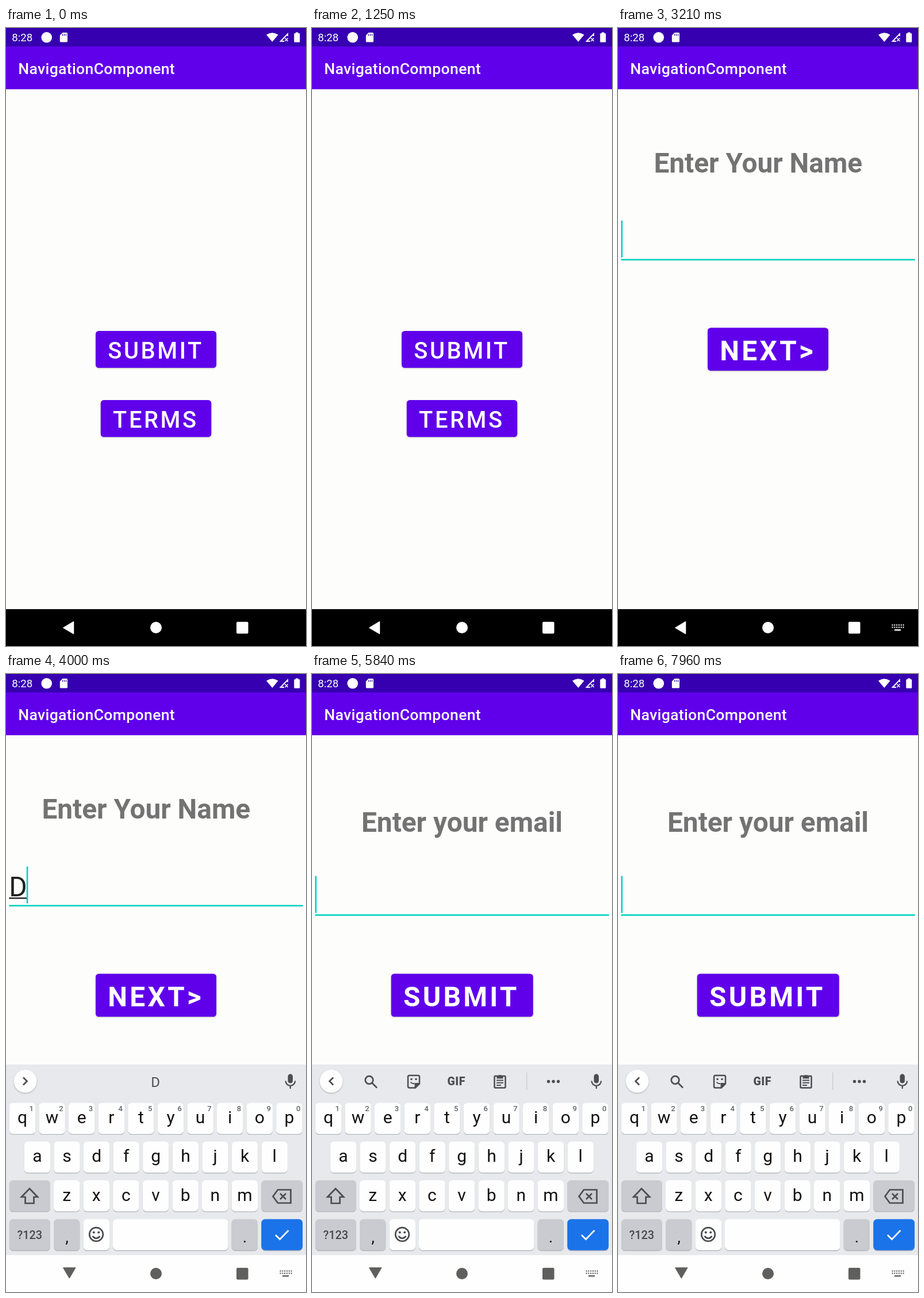
Write an HTML page that moves like this. It is 522x1073 px and loops after 8 s.

```html
<!DOCTYPE html>
<html lang="en">
<head>
<meta charset="utf-8">
<title>NavigationComponent</title>
<style>
  html, body { margin: 0; width: 100%; height: 100%; overflow: hidden; background: #fdfdfc; }
  svg { display: block; width: 522px; height: 1073px; font-family: Roboto, "Noto Sans", sans-serif; }
  text { white-space: pre; }
  .mid { text-anchor: middle; }
  .heading { font-size: 47.8px; font-weight: 700; fill: #737373; }
  .raised { filter: drop-shadow(0 1.4px 1.3px rgba(0, 0, 0, .28)); }
  .line { fill: none; stroke: #4a4d51; stroke-width: 2.7; }
  .icon { fill: #4a4d51; }
  .letter { font-size: 30px; fill: #111; text-anchor: middle; }
  .hint { font-size: 13px; font-weight: 500; fill: #5f6368; text-anchor: middle; }
</style>
</head>
<body>
<svg id="stage" viewBox="0 0 522 1073">
  <rect width="522" height="1073" fill="#fdfdfc"/>

  <g id="home"></g>

  <g id="nameScreen">
    <text class="heading" x="62.4" y="251">Enter Your Name</text>
    <text id="typed" x="5.3" y="386" font-size="47.8" fill="#212121"></text>
    <rect id="composing" x="5.3" y="388" height="2.4" fill="#212121"/>
    <rect x="5.3" y="400.9" width="511.5" height="2.7" fill="#0ad3c0"/>
    <rect id="nameCaret" x="5.3" y="334.3" width="2.7" height="64" fill="#0ad3c0"/>
  </g>

  <g id="emailScreen">
    <text class="heading mid" x="261" y="274">Enter your email</text>
    <rect x="5.3" y="417.2" width="511.5" height="2.7" fill="#0ad3c0"/>
    <rect id="mailCaret" x="5.3" y="350.8" width="2.7" height="64" fill="#0ad3c0"/>
  </g>

  <g id="keyboard">
    <rect y="678" width="522" height="334" fill="#e7e9ed"/>
    <g id="keys"></g>
    <path class="line" d="M41 893.5 55 908H48.5V919H33.5V908H27Z"/>
    <path class="line" d="M464.5 907 473 895.5H495.5V918.5H473ZM477 902l10 10m0-10-10 10"/>
    <circle class="line" cx="157" cy="973" r="11.8"/>
    <circle class="icon" cx="152.8" cy="969.5" r="2"/>
    <circle class="icon" cx="161.2" cy="969.5" r="2"/>
    <path class="line" d="M150.5 976Q157 983.5 163.500 976" stroke-width="2.400"/>
    <path class="line" d="M469 974l7.500 7.500L491.500 966" style="stroke:#fff"/>
    <text class="mid" x="41.300" y="981" font-size="19.800" font-weight="500" fill="#45484d">?123</text>
    <text class="mid" x="106" y="987" font-size="28" fill="#111">,</text>
    <text class="mid" x="415.500" y="987" font-size="28" fill="#111">.</text>

    <circle cx="33.500" cy="707" r="20" fill="#fefefe" class="raised"/>
    <rect class="icon" x="490.500" y="694.500" width="8.500" height="16" rx="4.250"/>
    <path class="line" d="M486.500 706.500a8.300 8.300 0 0 0 16.600 0M494.800 715v5" style="stroke-width:2.300"/>

    <g id="suggest">
      <path class="line" d="M30 700.500 36.500 707 30 713.500"/>
      <text id="word" class="mid" x="260" y="717" font-size="24" fill="#4d5055"></text>
    </g>

    <g id="tools">
      <path class="line" d="M37 700.500 30.500 707 37 713.500"/>
      <circle class="line" cx="99.500" cy="705" r="6.800"/>
      <path class="line" d="M104.500 710 113 718.500"/>
      <path class="line" d="M169.500 697H184.500Q187 697 187 699.500V711L179.500 718.500H169.500Q167 718.500 167 716V699.500Q167 697 169.500 697Z" style="stroke-width:2.500"/>
      <path class="icon" d="M188 710V712L180.500 719.500H178.500V710Z"/>
      <circle class="icon" cx="173" cy="703.500" r="1.800"/>
      <circle class="icon" cx="181" cy="703.500" r="1.800"/>
      <path class="line" d="M171.500 708.500Q174 712 178 711" style="stroke-width:2"/>
      <text class="mid icon" x="251.300" y="714" font-size="19.500" font-weight="900" letter-spacing=".6">GIF</text>
      <rect class="line" x="317.500" y="698" width="19" height="20.500" rx="1.500" style="stroke-width:2.500"/>
      <path class="icon" d="M321.500 698H324a3.200 3.200 0 0 1 6 0H332.500V702.500H321.500Z"/>
      <path class="line" d="M321 705.500H333M321 709.700H333M321 714H329" style="stroke-width:2"/>
      <rect x="373" y="692" width="1.300" height="30" fill="#c9ccd1"/>
      <circle class="icon" cx="411.500" cy="707.500" r="2.700"/>
      <circle class="icon" cx="420" cy="707.500" r="2.700"/>
      <circle class="icon" cx="428.500" cy="707.500" r="2.700"/>
    </g>
  </g>

  <rect width="522" height="32" fill="#3600b0"/>
  <rect y="32" width="522" height="74.300" fill="#6000eb"/>
  <text x="21.300" y="80" font-size="26.580" font-weight="500" letter-spacing=".330" fill="#fff">NavigationComponent</text>
  <g fill="#fff">
    <text x="10.300" y="23" font-size="18.600">8:28</text>
    <circle cx="70.700" cy="16.300" r="9.300"/>
    <path d="M98.500 8H105.500Q107 8 107 9.500V23Q107 24.500 105.500 24.500H95.300Q93.800 24.500 93.800 23V12.700Z"/>
    <path d="M463.300 24 453 11.800Q463.300 4.500 473.600 11.800Z"/>
    <path d="M491 8V14H489V12.800L480.300 22H484V24H475.500Z"/>
    <path d="M485.500 17.500l5 5.500m0-5.500-5 5.500" stroke="#fff" stroke-width="1.600"/>
    <path d="M504 7.500H508.500V9.300H510.200Q511.300 9.300 511.300 10.500V23.500Q511.300 24.700 510.200 24.700H502.400Q501.300 24.700 501.300 23.500V10.500Q501.300 9.300 502.400 9.300H504Z"/>
  </g>
  <path d="M98.500 10.500v3m3-3v3m3-3v3" stroke="#3600b0" stroke-width="1.300"/>

  <rect id="navBar" y="1009" width="522" height="64"/>
  <g id="navIcons">
    <path id="back" stroke="currentColor" stroke-width="1.500" stroke-linejoin="round"/>
    <circle cx="261" cy="1041" r="10"/>
    <rect x="401" y="1031" width="20.500" height="20.500" rx="2"/>
    <g id="imeIcon"></g>
  </g>
</svg>

<script>
const $ = id => document.getElementById(id);

function add(parent, tag, attrs, content) {
  const el = document.createElementNS("http://www.w3.org/2000/svg", tag);
  for (const k in attrs) el.setAttribute(k, attrs[k]);
  if (content) el.textContent = content;
  parent.append(el);
  return el;
}

function button(parent, label, x, y, w, h, size, weight, base) {
  add(parent, "rect", { x, y, width: w, height: h, rx: 5.3, fill: "#6000eb", class: "raised" });
  add(parent, "text", {
    x: x + 21.3, y: base, "font-size": size, "font-weight": weight,
    "letter-spacing": size * 0.0893, fill: "#fff"
  }, label);
}

button($("home"), "SUBMIT", 156, 526, 210, 64, 39.9, 500, 574);
button($("home"), "TERMS", 164.8, 646, 192.4, 64, 39.9, 500, 694);
button($("nameScreen"), "NEXT>", 156, 520.5, 210, 74.5, 47.8, 700, 577);
button($("emailScreen"), "SUBMIT", 137.7, 520.5, 247, 74.5, 47.8, 700, 577);

const WHITE = "#fefefe", GREY = "#c9cbd0", PITCH = 51.6;

function key(x, y, w, fill) {
  const box = { x, width: w, height: 54, rx: 6.5 };
  add($("keys"), "rect", { ...box, y: y + 1.4, fill: "#b4b6bb" });
  add($("keys"), "rect", { ...box, y, fill });
}

[["qwertyuiop", 5.8, 744.7], ["asdfghjkl", 31.7, 811.8], ["zxcvbnm", 83, 878.9]].forEach(([row, x0, y], r) => {
  [...row].forEach((ch, i) => {
    const x = x0 + i * PITCH;
    key(x, y, 45.4, WHITE);
    add($("keys"), "text", { class: "letter", x: x + 22.7, y: y + 35.6 }, ch);
    if (!r) add($("keys"), "text", { class: "hint", x: x + 38.5, y: y + 14.3 }, String((i + 1) % 10));
  });
});
key(5.8, 878.9, 71.2, GREY);
key(444.3, 878.9, 71.8, GREY);
[[5.8, 71.2, GREY], [83, 45.4, GREY], [134.6, 45.4, WHITE], [186, 200.4, WHITE],
 [392.6, 45.4, GREY], [444.3, 71.8, "#1a73e8"]].forEach(([x, w, fill]) => key(x, 946.5, w, fill));

for (let i = 0; i < 12; i++)
  add($("imeIcon"), "rect", { x: 476.5 + (i % 6) * 3.8, y: 1035.5 + (i > 5) * 4, width: 2.1, height: 2.1 });
add($("imeIcon"), "rect", { x: 481, y: 1044, width: 11, height: 2.4 });

const LOOP = 8000, NAME = "Dorelo";
const NAME_AT = 2760, IME_AT = 3340, SLIDE = 300, TYPE_AT = 3950, STEP = 160, MAIL_AT = 5560;

const show = (id, on) => $(id).setAttribute("display", on ? "inline" : "none");
const blink = age => age % 1000 < 500;

function render(t) {
  const onName = t >= NAME_AT && t < MAIL_AT, onMail = t >= MAIL_AT, ime = t >= IME_AT;
  show("home", t < NAME_AT);
  show("nameScreen", onName);
  show("emailScreen", onMail);

  const count = t < TYPE_AT ? 0 : Math.min(NAME.length, Math.floor((t - TYPE_AT) / STEP) + 1);
  const text = NAME.slice(0, count);
  const since = count ? TYPE_AT + (count - 1) * STEP : NAME_AT;
  if (onName) {
    $("typed").textContent = $("word").textContent = text;
    const w = count ? $("typed").getComputedTextLength() : 0;
    $("composing").setAttribute("width", w);
    $("nameCaret").setAttribute("x", 5.3 + Math.max(0, w - 1));
  }
  show("nameCaret", blink(t - since));
  show("mailCaret", blink(t - MAIL_AT));

  const left = 1 - Math.min(1, Math.max(0, (t - IME_AT) / SLIDE));
  show("keyboard", ime);
  $("keyboard").setAttribute("transform", `translate(0 ${332 * left ** 3})`);
  show("suggest", onName && count > 0);
  show("tools", onMail || !count);

  $("navBar").setAttribute("fill", ime ? WHITE : "#000");
  $("navIcons").setAttribute("fill", ime ? "#5f5f5d" : "#fff");
  $("navIcons").setAttribute("color", ime ? "#5f5f5d" : "#fff");
  $("back").setAttribute("d", ime ? "M100 1031H120.500L110.300 1048.500Z" : "M100 1041.300 117.500 1031V1051.500Z");
  show("imeIcon", t >= NAME_AT);
}

const start = performance.now();
function tick() {
  render((performance.now() - start) % LOOP);
  requestAnimationFrame(tick);
}
tick();
</script>
</body>
</html>
```
